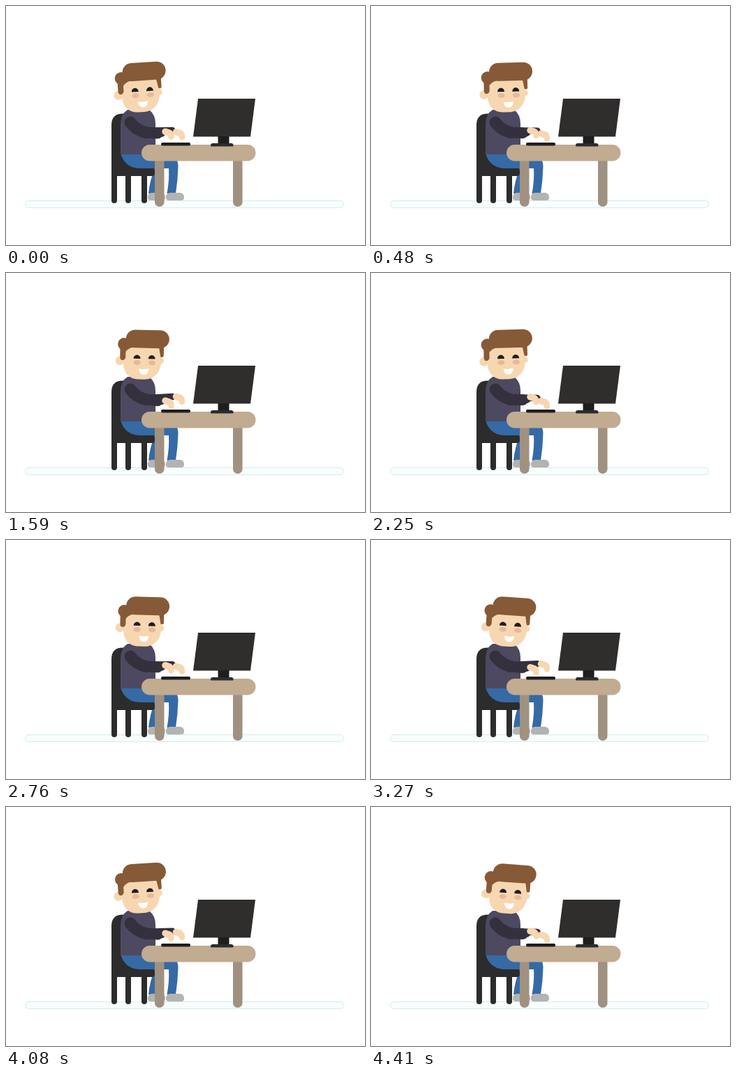
An HTML page with a canvas for the animation above (4440 ms loop, 514 by 343 pixels).

```html
<!DOCTYPE html>
<html lang="en">
<head>
<meta charset="utf-8">
<title>Typing at a desk</title>
<style>
html, body { margin: 0; width: 100%; height: 100%; overflow: hidden; background: #fff; }
canvas { display: block; width: 514px; height: 343px; }
</style>
</head>
<body>
<canvas id="stage" width="514" height="343"></canvas>
<script>
const ctx = document.getElementById('stage').getContext('2d');
const LOOP = 4440, STEP = 30;
const NOD_PERIOD = 588, TAP_PERIOD = 428, TAP_PEAK = 1600;
const BLINK = [900, 1020];
const C = {
  skin: '#f7d7b1', hair: '#865a37', blush: '#e9b79a', sweater: '#4d4960',
  sleeve: '#35303d', jeans: '#356aa5', shoe: '#b3b3b2', dark: '#2c2c2c',
  black: '#1e1e1f', top: '#c1ab91', leg: '#a09180'
};

function box(color, x, y, w, h, radius = 0) {
  ctx.fillStyle = color;
  ctx.beginPath();
  ctx.roundRect(x, y, w, h, radius);
  ctx.fill();
}

function oval(color, x, y, rx, ry = rx, from = 0, to = Math.PI * 2) {
  ctx.fillStyle = color;
  ctx.beginPath();
  ctx.ellipse(x, y, rx, ry, 0, from, to);
  ctx.fill();
}

function shape(color, d) {
  ctx.fillStyle = color;
  ctx.fill(new Path2D(d));
}

function limb(color, width, d) {
  ctx.strokeStyle = color;
  ctx.lineWidth = width;
  ctx.lineCap = ctx.lineJoin = 'round';
  ctx.stroke(new Path2D(d));
}

function floor() {
  box('#f8fdfd', 27.5, 279.5, 456, 10, 5);
  ctx.strokeStyle = '#d5ebed';
  ctx.lineWidth = 1;
  ctx.stroke();
}

function farLeg() {
  shape(C.jeans, 'M212 228H227Q219 248 217 269H204Q206 250 212 236Z');
  box(C.shoe, 203, 268, 25, 11, [6, 6, 4, 4]);
}

function chair() {
  shape(C.dark, 'M151 244V171Q151 154.5 167 154.5H180V231H207Q213 231 213 237V240Q213 244 209 244Z');
  for (const x of [151, 171, 194]) box(C.dark, x, 236, 8, 47, [0, 0, 4, 4]);
}

function nearLeg() {
  shape(C.jeans, 'M164 211H230Q246 213 246.5 230Q246 250 243 269H230.5Q234 250 233 233H190Q169 231 164 211Z');
  box(C.shoe, 229, 268, 26, 11, [6, 6, 4, 4]);
}

function torso() {
  shape(C.sweater, 'M164 213V170Q164 155 174 149H205Q214 156 214 169V213Z');
}

function face(blinking) {
  oval(C.skin, 163, 127, 6.5);
  oval(C.skin, 221.5, 126, 4.5);
  shape(C.skin, 'M168 105H222V127C222 143 212 153 198 153H190C177 153 168 144 168 130Z');
  shape(C.hair, 'M163 104H178Q172 107 171 114V122Q170 126 166.5 126Q163 126 163 121Z');
  oval(C.hair, 168.5, 103, 9);
  box(C.hair, 171, 82, 62, 26, 13);
  shape(C.hair, 'M171 95H184V107Q175 108 171 114ZM218 104H225.5V119Q224 122 221 120Z');
  oval(C.blush, 187.5, 129, 5.2, 3.4);
  oval(C.blush, 209, 129, 5.2, 3.4);
  if (!blinking) {
    oval(C.black, 187.3, 123.5, 5, 5.5, Math.PI, 0);
    oval(C.black, 208.5, 123.5, 5, 5.5, Math.PI, 0);
  }
  shape('#fff', 'M190.5 138Q197.5 139.5 204.5 137.5Q204 146.5 197.5 146.5Q191 146 190.5 138Z');
}

function head(t) {
  const nod = (1 - Math.cos(2 * Math.PI * t / NOD_PERIOD)) / 2;
  ctx.save();
  ctx.translate(189.5, 152.5);
  ctx.rotate((8 * nod - 3.8) * Math.PI / 180);
  ctx.translate(-190, -153);
  face(t >= BLINK[0] && t < BLINK[1]);
  ctx.restore();
}

function hand(x, y) {
  limb(C.skin, 9.5, `M${x - 4} ${y - 2}L${x + 2} ${y}`);
  limb(C.skin, 8.5, `M${x + 2} ${y}Q${x + 4.5} ${y + 1} ${x + 4.5} ${y + 5.5}`);
}

function arms(t) {
  const lift = Math.cos(2 * Math.PI * (t - TAP_PEAK) / TAP_PERIOD);
  const farY = 182.5 - 3.3 * lift, nearY = 182.5 + 2.7 * lift;
  limb(C.sleeve, 9.5, `M212 179L238 ${178.5 - lift}`);
  hand(247.5, farY);
  limb(C.sleeve, 17, 'M178 167Q186 178 200 181.5');
  limb(C.sleeve, 16, `M200 181.5L217 ${182.5 + lift * 0.5}`);
  limb(C.sleeve, 12, `M215 182L222.5 ${182 + lift}`);
  hand(232, nearY);
}

function desk() {
  for (const x of [213, 325]) box(C.leg, x, 212, 13.5, 76, [0, 0, 6.5, 6.5]);
  box(C.top, 194, 199, 163.5, 23.5, 11.7);
  box(C.black, 222, 196, 42, 4.5, 2);
}

function monitor() {
  shape('#2f2e2d', 'M275 133H357L350 187.5H268Z');
  box(C.black, 303.5, 187, 16, 12);
  box(C.dark, 293, 197, 32.5, 4.5, [3, 3, 1, 1]);
}

function draw(now) {
  const t = Math.floor(now % LOOP / STEP) * STEP;
  ctx.fillStyle = '#fff';
  ctx.fillRect(0, 0, 514, 343);
  floor();
  farLeg();
  chair();
  nearLeg();
  torso();
  head(t);
  desk();
  monitor();
  arms(t);
  requestAnimationFrame(draw);
}

requestAnimationFrame(draw);
</script>
</body>
</html>
```
